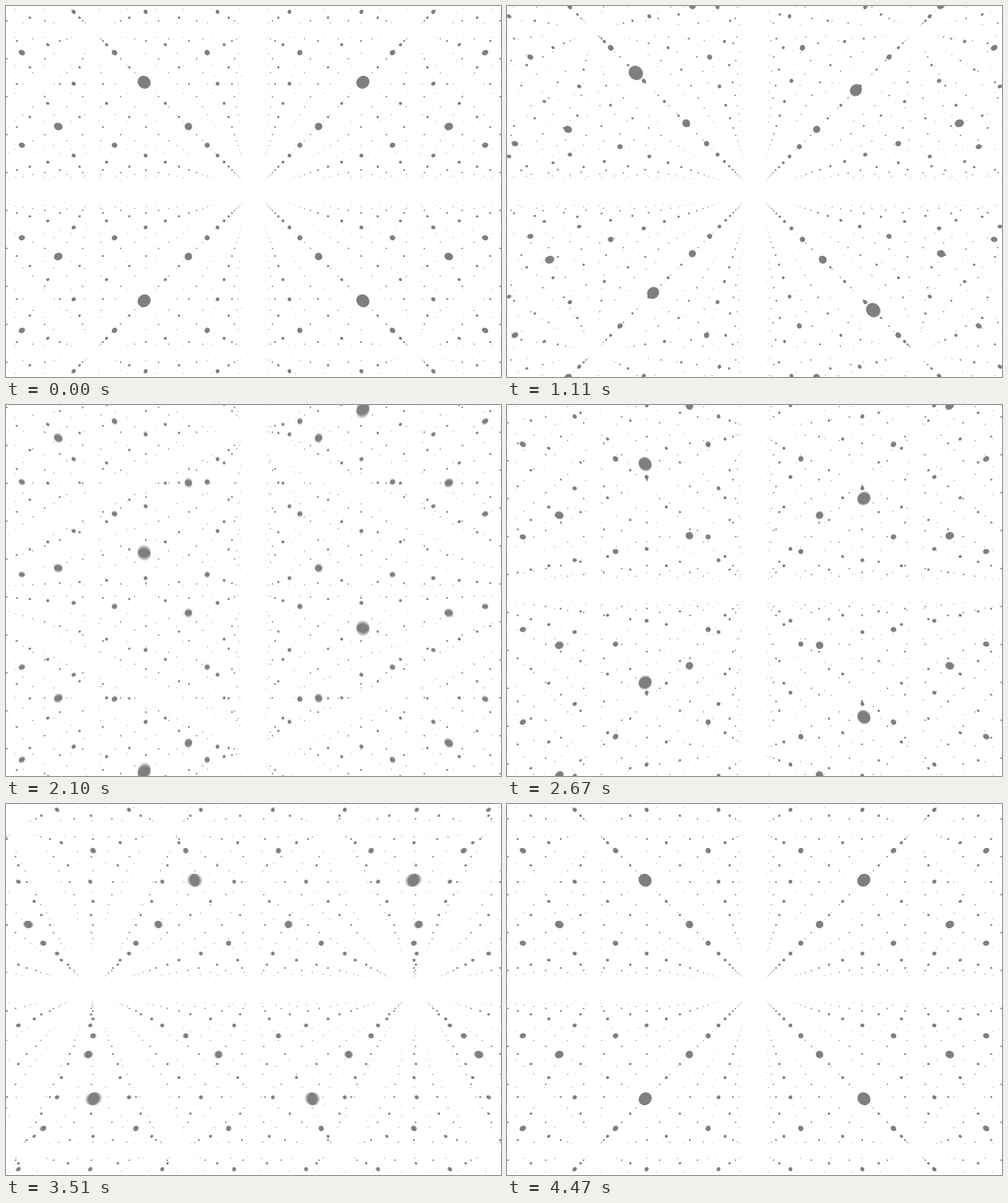
An HTML page with a canvas that plays this animation: 800 by 600 pixels, repeating every 4.5 s.

```html
<!DOCTYPE html>
<html lang="en">
<head>
<meta charset="utf-8">
<title>Lattice</title>
<style>
  html, body { margin: 0; width: 100%; height: 100%; overflow: hidden; background: #fff; }
  canvas { display: block; }
</style>
</head>
<body>
<canvas id="stage" width="800" height="600"></canvas>
<script>
const W = 800, H = 600;
const STEP = 30, FRAMES = 150, PHASE = 50;
const FOCAL = H / 2 / Math.tan(Math.PI / 6);
const CELL = 353.5;
const NEAR = FOCAL / CELL;      // depth of the first layer, in cells
const RADIUS = 10 / CELL;
const LAYERS = 13;
const SAMPLES = 6, SHUTTER = 0.6;

const view = document.getElementById('stage').getContext('2d');
const layer = document.createElement('canvas');
layer.width = W;
layer.height = H;
const ctx = layer.getContext('2d');

const ease = u => {
  const a = u ** 1.89, b = (1 - u) ** 1.89;
  return a / (a + b);
};
const sign = n => n & 1 ? 1 : -1;

// Adds one sphere, stretched away from the centre by the perspective.
function sphere(x, y, z) {
  if (z < 0.2) return;
  const scale = FOCAL / z;
  const px = x * scale, py = y * scale;
  const r = RADIUS * scale * Math.min(1, 1 - 0.065 * (z - 3));
  if (Math.abs(px) > W / 2 + 2 * r || Math.abs(py) > H / 2 + 2 * r) return;
  const cx = W / 2 + px, cy = H / 2 + py;
  if (r < 0.9) {
    const s = r * 1.77;
    ctx.rect(cx - s / 2, cy - s / 2, s, s);
    return;
  }
  const long = r * Math.hypot(1, x / z, y / z);
  const angle = Math.atan2(py, px);
  ctx.moveTo(cx + long * Math.cos(angle), cy + long * Math.sin(angle));
  ctx.ellipse(cx, cy, long, r, angle, 0, 2 * Math.PI);
}

// Neighbouring rows slide one cell in opposite directions: depth, then y, then x.
function drawLattice(time) {
  const phase = Math.floor(time / PHASE);
  const s = ease(time / PHASE - phase);
  ctx.fillStyle = '#fff';
  ctx.fillRect(0, 0, W, H);
  ctx.fillStyle = '#7f7f7f';
  ctx.beginPath();
  for (let k = -1; k < LAYERS; k++) {
    const depth = NEAR + k;
    const nx = Math.ceil((depth + 1) * W / 2 / FOCAL) + 1;
    const ny = Math.ceil((depth + 1) * H / 2 / FOCAL) + 1;
    for (let i = -nx; i < nx; i++) {
      for (let j = -ny; j < ny; j++) {
        let x = i + 0.5, y = j + 0.5, z = depth;
        if (phase === 0) z += (i + j) & 1 ? 1 - s : s;
        else if (phase === 1) y += sign(i + k) * s;
        else x += sign(j + k) * s;
        sphere(x, y, z);
        // the layer coming in from behind the camera
        if (phase === 0 && k === -1) sphere(x, y, z - 1);
      }
    }
  }
  ctx.fill();
}

// Averages several moments within the open shutter.
function drawFrame(frame) {
  for (let n = 0; n < SAMPLES; n++) {
    drawLattice(frame + SHUTTER * (n + 0.5) / SAMPLES);
    view.globalAlpha = 1 / (n + 1);
    view.drawImage(layer, 0, 0);
  }
}

const start = performance.now();
let shown = -1;
function tick() {
  const frame = Math.floor((performance.now() - start) / STEP) % FRAMES;
  if (frame !== shown) {
    shown = frame;
    drawFrame(frame);
  }
  requestAnimationFrame(tick);
}
tick();
</script>
</body>
</html>
```
